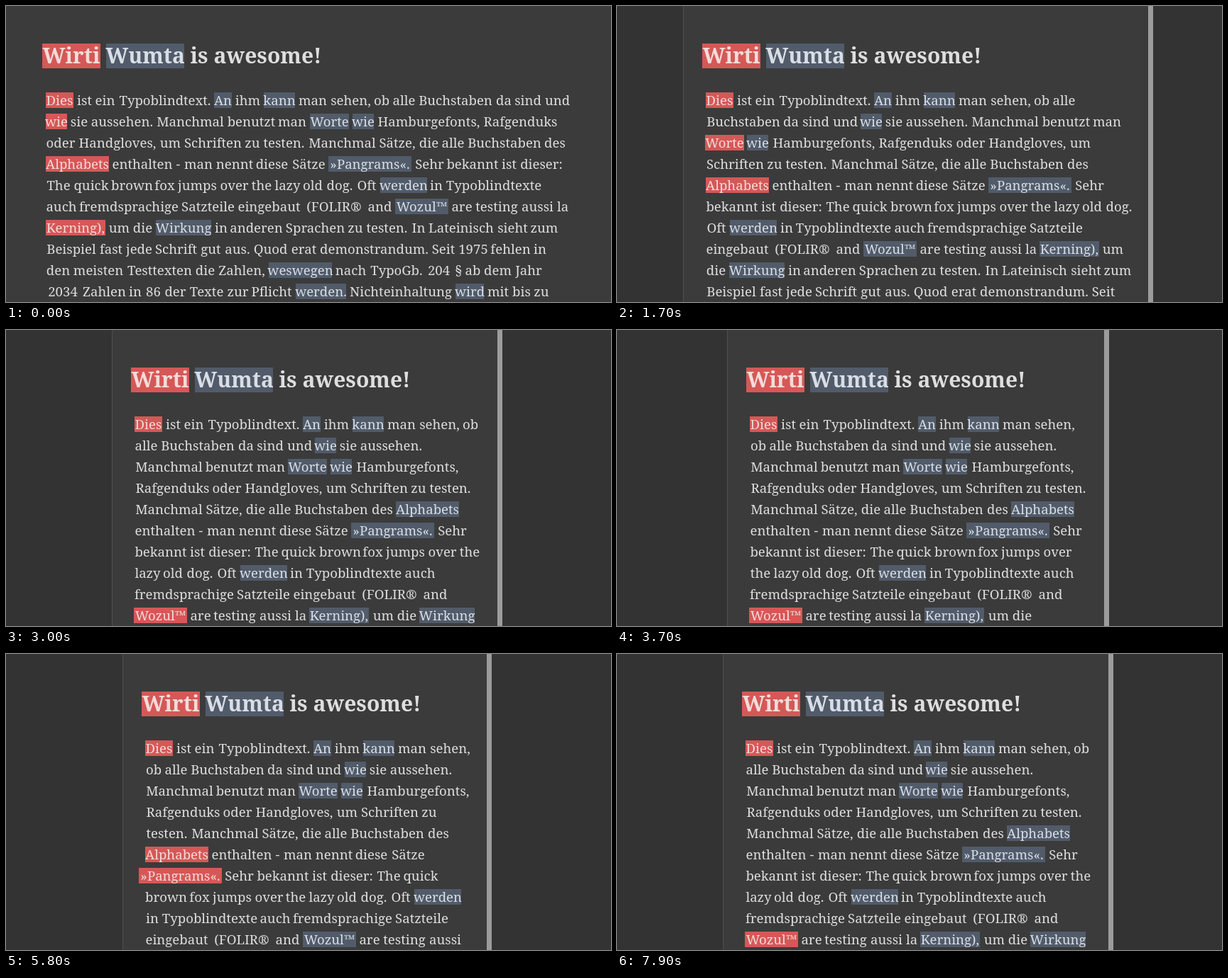
An HTML page that plays this animation: 852x418 px, repeating every 8 s.

```html
<!DOCTYPE html>
<html lang="de">
<head>
<meta charset="utf-8">
<title>Optical margins</title>
<style>
  html, body { margin: 0; width: 100%; height: 100%; overflow: hidden; background: #333; }
  body { position: relative; font-family: 'Noto Serif', serif; color: #dedede; }
  #panel { position: absolute; top: 0; height: 100%; box-sizing: border-box;
    background: #3b3b3b; border-left: 1px solid #505050; border-right: 7px solid #9c9c9c; }
  h1, p { position: absolute; top: 0; left: 0; margin: 0; font-weight: inherit; }
  span { position: absolute; top: 0; left: 0; height: 22px; line-height: 22px; white-space: nowrap;
    display: flex; justify-content: center; }
  h1 span { height: 35px; line-height: 33px; font-size: 30px; font-weight: bold; }
  .mark { background: #515b6a; color: #d9dee6; }
  .hang { background: #d55857; color: #f4dbd8; }
</style>
</head>
<body>
<div id="panel"></div>
<h1></h1>
<p></p>
<script>
const text = `Dies ist ein Typoblindtext. An ihm kann man sehen, ob alle Buchstaben da sind und
wie sie aussehen. Manchmal benutzt man Worte wie Hamburgefonts, Rafgenduks oder Handgloves, um
Schriften zu testen. Manchmal Sätze, die alle Buchstaben des Alphabets enthalten - man nennt diese
Sätze »Pangrams«. Sehr bekannt ist dieser: The quick brown fox jumps over the lazy old dog. Oft
werden in Typoblindtexte auch fremdsprachige Satzteile eingebaut (FOLIR® and Wozul™ are testing
aussi la Kerning), um die Wirkung in anderen Sprachen zu testen. In Lateinisch sieht zum Beispiel
fast jede Schrift gut aus. Quod erat demonstrandum. Seit 1975 fehlen in den meisten Testtexten die
Zahlen, weswegen nach TypoGb. 204 § ab dem Jahr 2034 Zahlen in 86 der Texte zur Pflicht werden.
Nichteinhaltung wird mit bis zu`;

// Glyph advances in 1/1000 em; they decide word positions and line breaks.
const advances = {
  'abcdefghijklmnopqrstuvwxyz': '504 560 454 575 484 325 509 582 293 291 535 287 880 591 539 571 560 410 432 346 576 497 738 504 493 443',
  'ABCDEFGHIJKLMNOPQRSTUVWXYZ': '671 654 642 750 653 600 726 815 389 518 695 603 928 767 744 610 744 702 561 618 757 666 977 710 615 602',
  '0123456789': '614 429 559 551 565 528 566 502 596 565',
  '.,():-§ä®™»«': '270 270 375 375 313 374 500 504 910 940 560 560'
};
const em = {};
for (const [chars, widths] of Object.entries(advances))
  widths.split(' ').forEach((w, i) => em[chars[i]] = w / 1000);

const SIZE = 20, SPACE = 4.82, LINE = 30, TOP = 122, CENTER = 426;
const HANG = { '»': 10, W: 2.5 };
const isMarked = word => /^[ADKVWkw»]/.test(word);

function addSpan(parent, word) {
  const el = parent.appendChild(document.createElement('span'));
  el.textContent = word;
  return el;
}

const panel = document.querySelector('#panel');
const heading = document.querySelector('h1');
const para = document.querySelector('p');

[['Wirti', 0, 82, 'hang'], ['Wumta', 90, 110, 'mark'], ['is', 208, 26, ''], ['awesome!', 241, 153, '']]
  .forEach(([word, x, width, cls]) => {
    const el = addSpan(heading, word);
    el.className = cls;
    el.style.cssText = `left:${x}px;top:53px;width:${width}px`;
  });

const words = text.split(/\s+/).map(word => {
  const width = SIZE * [...word].reduce((sum, c) => sum + em[c], 0);
  const el = addSpan(para, word);
  el.style.width = Math.round(width) + 'px';
  return { el, width, marked: isMarked(word), hang: HANG[word[0]] || 0.8 };
});

// One font size for the whole paragraph, so that it sets as wide as the advances.
const pen = document.createElement('canvas').getContext('2d');
pen.font = "100px 'Noto Serif', serif";
const natural = words.reduce((sum, w) => sum + pen.measureText(w.el.textContent).width, 0);
const wanted = words.reduce((sum, w) => sum + w.width, 0);
para.style.fontSize = 100 * wanted / natural + 'px';

// Left edge of the panel: [ms, px]
const path = [[0, -14], [1700, 93], [2400, 137], [3700, 155], [5800, 164], [6900, 157], [7900, 149], [8000, 148]];

function slope(i) {
  const a = path[Math.max(i - 1, 0)], b = path[Math.min(i + 1, path.length - 1)];
  return (b[1] - a[1]) / (b[0] - a[0]);
}

function edgeAt(t) {
  const i = Math.max(path.findIndex((p, k) => k && t <= p[0]) - 1, 0);
  const [t0, a] = path[i], [t1, b] = path[i + 1];
  const d = t1 - t0, u = (t - t0) / d, v = 1 - u;
  return a * v * v * (1 + 2 * u) + b * u * u * (3 - 2 * u)
    + d * u * v * (slope(i) * v - slope(i + 1) * u);
}

function layout(left) {
  const right = 2 * CENTER - left + 0.5;
  let x = left, line = 0, first = true;
  for (const w of words) {
    if (!first && x + w.width > right) {
      x = left;
      line++;
      first = true;
    }
    if (first && w.marked) x -= w.hang;
    w.el.className = w.marked ? (first ? 'hang' : 'mark') : '';
    w.el.style.transform = `translate(${Math.round(x)}px, ${TOP + line * LINE}px)`;
    x += w.width + SPACE;
    first = false;
  }
}

const start = performance.now();
function frame() {
  const t = Math.floor((performance.now() - start) % 8000 / 100) * 100;
  const edge = Math.round(edgeAt(t));
  const left = Math.max(57, edge + 33);
  panel.style.left = edge + 'px';
  panel.style.width = 848 - 2 * edge + 'px';
  heading.style.left = left - 6 + 'px';
  layout(left);
  requestAnimationFrame(frame);
}
frame();
</script>
</body>
</html>
```
